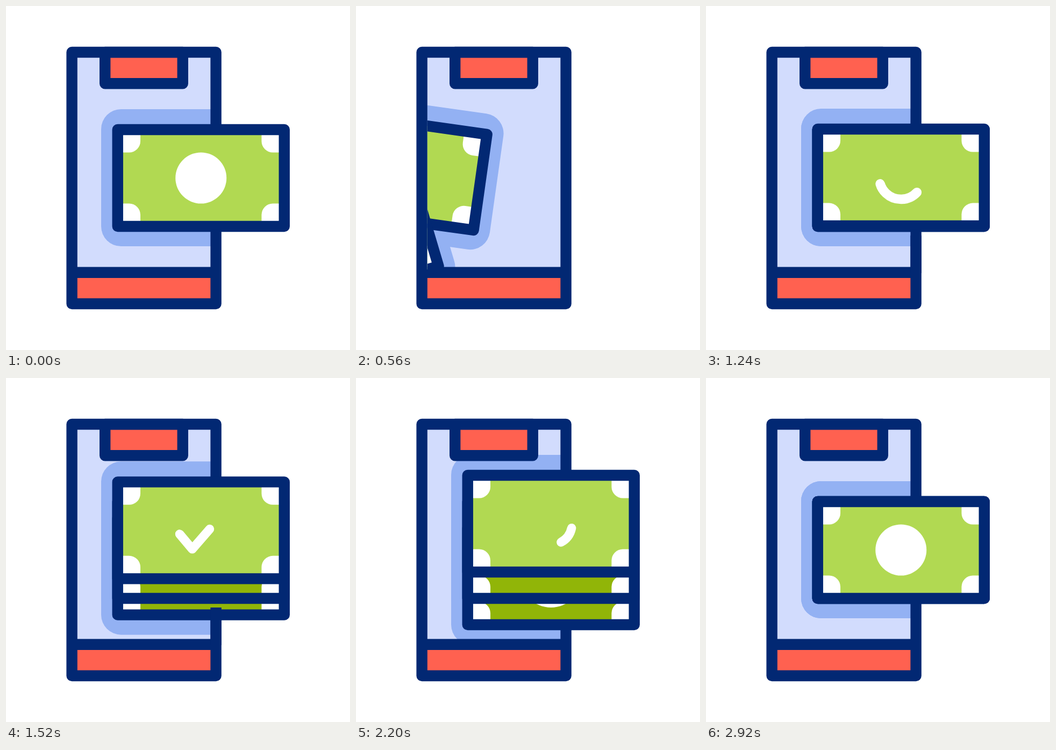
An HTML page with a canvas that plays this animation: 640x640 px, repeating every 3 s.

```html
<!DOCTYPE html>
<html lang="en">
<head>
<meta charset="utf-8">
<title>Mobile payment</title>
<style>
html, body { margin: 0; width: 100%; height: 100%; overflow: hidden; background: #fff; }
canvas { display: block; width: 640px; height: 640px; }
</style>
</head>
<body>
<canvas id="stage" width="640" height="640"></canvas>
<script>
const c = document.getElementById('stage').getContext('2d');
const NAVY = '#022873', RED = '#ff6150', SCREEN = '#d2dcfd', SHADE = '#93b1f3',
      GREEN = '#b1d952', OLIVE = '#91b508', WHITE = '#fff';
const LOOP = 3000, STEP = 40, LINE = 20.4, RAD = Math.PI / 180;

// Linear and eased progress between two times
const lin = (t, a, b) => Math.min(1, Math.max(0, (t - a) / (b - a)));
const ease = (t, a, b) => { const u = lin(t, a, b); return u * u * (3 - 2 * u); };

function box(x, y, w, h, fill) {
  c.fillStyle = fill;
  c.fillRect(x, y, w, h);
}

function frame(x, y, w, h) {
  c.strokeStyle = NAVY;
  c.lineWidth = LINE;
  c.lineJoin = 'round';
  c.strokeRect(x, y, w, h);
}

function clipped(x, y, w, h, draw) {
  c.save();
  c.beginPath();
  c.rect(x, y, w, h);
  c.clip();
  draw();
  c.restore();
}

function placed({ x = 0, y = 0, turn = 0 }, draw) {
  c.save();
  c.translate(362.75 + x, 320 + y);
  c.rotate(turn * RAD);
  draw();
  c.restore();
}

function disc(r) {
  c.fillStyle = WHITE;
  c.beginPath();
  c.arc(0, 0, r, 0, 7);
  c.fill();
}

function ring(r, width, from, to) {
  if (to <= from) return;
  c.lineWidth = width;
  c.beginPath();
  c.arc(0, 0, r, from * RAD, to * RAD);
  c.stroke();
}

function check(from, to) {
  const len = 112.1;
  if (to <= from) return;
  c.lineWidth = 16.5;
  c.setLineDash([(to - from) * len, 999]);
  c.lineDashOffset = -from * len;
  c.beginPath();
  c.moveTo(-39.7, 7);
  c.lineTo(-16.2, 35);
  c.lineTo(33.3, -22);
  c.stroke();
  c.setLineDash([]);
}

// Spinner, then tick, then ring that fills up
function status(t) {
  c.strokeStyle = WHITE;
  c.lineCap = c.lineJoin = 'round';
  ring(40.5, 17.5, 163 + 360 * lin(t, 1080, 1320), 163 + 360 * lin(t, 640, 1040));
  check(lin(t, 2000, 2200), lin(t, 1290, 1590));
  const width = 16.5 + 31 * ease(t, 2470, 2760);
  if (t >= 2760) disc(47.5);
  else ring(47.5 - width / 2, width, 12, 12 + 360 * lin(t, 2160, 2450));
}

function bill(pose, fill, mark) {
  placed(pose, () => {
    box(-155, -90, 310, 180, fill);
    c.fillStyle = WHITE;
    for (const sx of [-1, 1]) for (const sy of [-1, 1]) {
      c.save();
      c.scale(sx, sy);
      c.beginPath();
      c.roundRect(112.7, 47.5, 42, 42, [21, 0, 0, 0]);
      c.fill();
      c.restore();
    }
    if (mark) mark();
    frame(-155, -90, 310, 180);
  });
}

function shadow(pose) {
  placed(pose, () => {
    c.fillStyle = SHADE;
    c.beginPath();
    c.roundRect(-185.7, -128, 371.4, 255, 37);
    c.fill();
  });
}

function phone(shadows) {
  box(122, 86, 268, 468, SCREEN);
  clipped(133, 96, 248, 390, () => shadows.forEach(shadow));
  box(184, 86, 145, 58, RED);
  box(122, 496, 268, 58, RED);
  frame(184.2, 86, 144.6, 58.3);
  frame(122.6, 86, 268, 468);
  box(122, 485.5, 268, 20.5, NAVY);
}

function draw(t) {
  box(0, 0, 640, 640, WHITE);

  // The old bill leaves on a curve while the new one swings in
  const out = -489 * ease(t, 0, 800);
  const old = { x: out, y: .00169 * out * out + .33 * out, turn: .0431 * out };
  const back = -440 * (1 - ease(t, 240, 1040));
  const fresh = { x: back, y: -.0006 * back * back - .123 * back, turn: -.0281 * back };

  // The stack opens, settles and closes
  const closing = 1 - ease(t, 2240, 2640);
  const settle = 3 * ease(t, 1700, 1840);
  const rise = (52 * ease(t, 1200, 1700) - settle) * closing;
  const drop = (52 * ease(t, 1240, 1740) - settle) * closing;
  const stacked = t >= 1160;
  const top = stacked ? { y: -rise } : fresh;
  const low = { y: drop };

  const shadows = [top];
  if (t < 800) shadows.push(old);
  if (stacked) shadows.push({}, low);
  phone(shadows);

  clipped(132.8, 0, 500, 507, () => {
    if (stacked) {
      bill(low, OLIVE, () => disc(58));
      if (t < 1560) box(380.4, 427, 20.4, 70, NAVY);
      bill({}, OLIVE);
    }
    bill(top, GREEN, () => status(t));
    if (t < 800) bill(old, GREEN, () => disc(47.5));
  });
}

const start = performance.now();
function tick() {
  const t = (performance.now() - start) % LOOP;
  draw(Math.min(2920, Math.floor(t / STEP) * STEP));
  requestAnimationFrame(tick);
}
tick();
</script>
</body>
</html>
```
